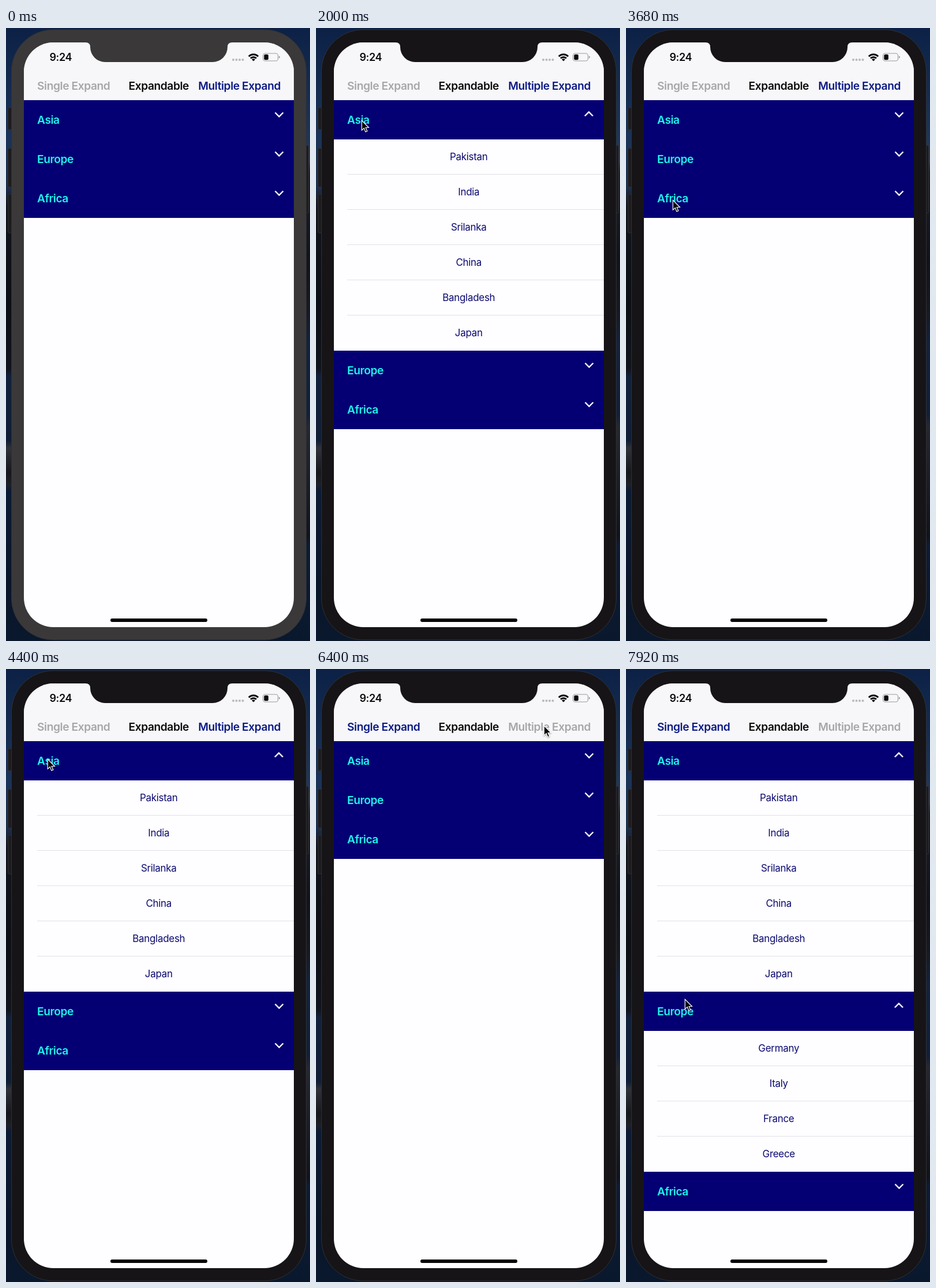
Write an HTML page that moves like this. It is 527x1062 px and loops after 8 s.

```html
<!DOCTYPE html>
<html lang="en">
<head>
<meta charset="utf-8">
<title>Expandable list</title>
<style>
  html, body { margin: 0; width: 100%; height: 100%; overflow: hidden; }
  body {
    position: relative;
    font: 600 19.2px/1 Inter, Roboto, sans-serif;
    letter-spacing: -.022em;
    background: #0b1a30;
  }
  .stage { position: absolute; left: 0; top: 0; width: 527px; height: 1062px; overflow: hidden; }
  .stage > * { position: absolute; }
  svg { display: block; overflow: visible; }

  /* Night coast behind the phone */
  .sky { top: 0; height: 1062px; }
  .west {
    left: 0; width: 264px;
    background: linear-gradient(#0c2145, #1a3357 190px, #1d2f4c 275px, #11151d 310px, #0b0e15 480px,
      #10141c 590px, #12213b 604px, #0f1d35 715px, #30323a 728px, #15171d 770px, #1d2028 792px,
      #0c1b34 800px, #091529 960px, #0a182d);
  }
  .east {
    left: 264px; width: 263px;
    background: linear-gradient(#0c2145, #1a3357 170px, #263a58 232px, #1b1f29 250px, #11141b 400px,
      #171a21 490px, #12233e 545px, #10203a 670px, #252831 690px, #11141b 880px,
      #0d1c35 895px, #0a182d);
  }

  /* Bezel turns dark when the window gains focus */
  .phone { left: 0; top: 0; color: #3a3839; animation: focus 8s step-end infinite; }
  @keyframes focus { 0% { color: #3a3839 } 16% { color: #161416 } }

  .screen {
    left: 30.5px; top: 25px; width: 468.5px; height: 1013px;
    border-radius: 51px; overflow: hidden; background: #fefdff;
  }
  .bar { position: absolute; left: 0; top: 0; width: 100%; height: 100px; background: #f7f6f8; }
  .bar span { position: absolute; top: 63px; line-height: 24px; white-space: nowrap; }
  .bar .time { left: 45px; top: 14px; font-size: 18px; color: #0b0b0c; }
  .single { left: 23.5px; animation: single 8s step-end infinite; }
  .title { left: 0; width: 100%; text-align: center; color: #0b0b0c; }
  .multi { right: 23px; animation: multi 8s step-end infinite; }
  @keyframes single { 0% { color: #a7a6a9 } 79% { color: #0b1a84 } }
  @keyframes multi { 0% { color: #0b1a84 } 79% { color: #a7a6a9 } }

  .list { position: absolute; left: 0; top: 100px; width: 100%; }
  h2 {
    position: relative; margin: 0; padding-left: 23.5px; height: 68px;
    font: inherit; line-height: 68.6px; color: #1ff3ec; background: #040073;
  }
  h2 svg {
    position: absolute; left: 435.5px; top: 21px; width: 15px; height: 8px;
    fill: none; stroke: #fff; stroke-width: 2.4;
  }
  ul {
    margin: 0; padding: 0; height: 0; overflow: hidden; list-style: none;
    font-weight: 400; font-size: 17px; letter-spacing: -.018em; text-align: center; color: #0b0a70;
  }
  li { position: relative; height: 61px; line-height: 61px; }
  li:not(:last-child)::after {
    content: ""; position: absolute; left: 23px; right: 0; bottom: 0; height: 1px; background: #e1e0e5;
  }

  .asia ul { animation: asia 8s ease-in-out infinite; }
  .asia svg { animation: asia-flip 8s step-end infinite; }
  .europe ul { animation: europe 8s ease-in-out infinite; }
  .europe svg { animation: europe-flip 8s step-end infinite; }
  @keyframes asia {
    0%, 19.5%, 29.5%, 49.5%, 79%, 85.5% { height: 0 }
    22.5%, 26.5%, 52.5%, 78.99%, 88.5%, 100% { height: 366px }
  }
  @keyframes asia-flip {
    0%, 26.5%, 79% { transform: none }
    19.5%, 49.5%, 85.5% { transform: translate(-.5px, -1px) scaleY(-1) }
  }
  @keyframes europe {
    0%, 29.5%, 40.5%, 94.5% { height: 0 }
    32.5%, 37.5%, 97.5%, 100% { height: 244px }
  }
  @keyframes europe-flip {
    0%, 37.5% { transform: none }
    29.5%, 94.5% { transform: translate(-.5px, -1px) scaleY(-1) }
  }

  .pointer { left: 0; top: 0; filter: drop-shadow(0 1px 1px #0006); animation: point 8s ease-in-out infinite; }
  @keyframes point {
    0%, 10% { transform: translate(-20px, 330px) }
    18%, 26.5% { transform: translate(79px, 160px) }
    29%, 38% { transform: translate(86px, 222px) }
    42%, 46.5% { transform: translate(81px, 298px) }
    49%, 55% { transform: translate(72px, 156px) }
    62%, 65% { transform: translate(170px, 436px) }
    69%, 70% { transform: translate(168px, 333px) }
    76%, 81% { transform: translate(395px, 98px) }
    85%, 89% { transform: translate(79px, 152px) }
    94%, 100% { transform: translate(102px, 572px) }
  }
</style>
</head>
<body>
<div class="stage">
  <div class="sky west"></div>
  <div class="sky east"></div>

  <svg class="phone" width="527" height="1062">
    <g fill="#1c1b1e" stroke="#303034">
      <rect x="3.5" y="138" width="9" height="38" rx="2"/>
      <rect x="3.5" y="208.5" width="9" height="67" rx="2"/>
      <rect x="3.5" y="288" width="9" height="67" rx="2"/>
      <rect x="516" y="203.5" width="8.5" height="117" rx="2"/>
      <rect x="9.5" y="3" width="511" height="1057" rx="72" fill="currentColor"/>
    </g>
  </svg>

  <div class="screen">
    <div class="bar">
      <span class="time">9:24</span>
      <span class="single">Single Expand</span>
      <span class="title">Expandable</span>
      <span class="multi">Multiple Expand</span>
    </div>
    <div class="list">
      <section class="asia">
        <h2>Asia<svg><path d="M.5 .5 7.5 7.5 14.5 .5"/></svg></h2>
        <ul><li>Pakistan<li>India<li>Srilanka<li>China<li>Bangladesh<li>Japan</ul>
      </section>
      <section class="europe">
        <h2>Europe<svg><path d="M.5 .5 7.5 7.5 14.5 .5"/></svg></h2>
        <ul><li>Germany<li>Italy<li>France<li>Greece</ul>
      </section>
      <section>
        <h2>Africa<svg><path d="M.5 .5 7.5 7.5 14.5 .5"/></svg></h2>
      </section>
    </div>
  </div>

  <svg class="phone" width="527" height="1062">
    <path fill="currentColor" d="M138 24v1q8 0 8 8a26 26 0 0 0 26 26H358a26 26 0 0 0 26-26q0-8 8-8v-1z"/>
    <path d="M394 55h18.5" fill="none" stroke="#b9b8bb" stroke-width="4" stroke-linecap="round" stroke-dasharray="0 5.5"/>
    <g fill="none" stroke="#0b0b0c" stroke-width="2.9">
      <path d="M420.8 49.2a11.6 11.6 0 0 1 16.4 0"/>
      <path d="M424 52.6a7 7 0 0 1 10 0"/>
    </g>
    <path d="M426 54.4a4.2 4.2 0 0 1 6 0l-3 3.1z" fill="#0b0b0c"/>
    <rect x="445.5" y="44" width="26" height="13" rx="3.8" fill="none" stroke="#9a999c" stroke-width="1.1"/>
    <rect x="447.3" y="45.8" width="7.6" height="9.4" rx="2" fill="#0b0b0c"/>
    <path d="M473 48.3q2 .6 2 2.2t-2 2.2z" fill="#9a999c"/>
    <rect x="181" y="1023" width="168" height="6" rx="3" fill="#050505"/>
  </svg>

  <svg class="pointer" width="14" height="22">
    <path d="M.3 .3V17.2L4.2 13.5 6.9 19.9 9.8 18.7 7.1 12.5H12.4z" fill="#050505" stroke="#fff" stroke-width="1.2"/>
  </svg>
</div>
</body>
</html>
```
